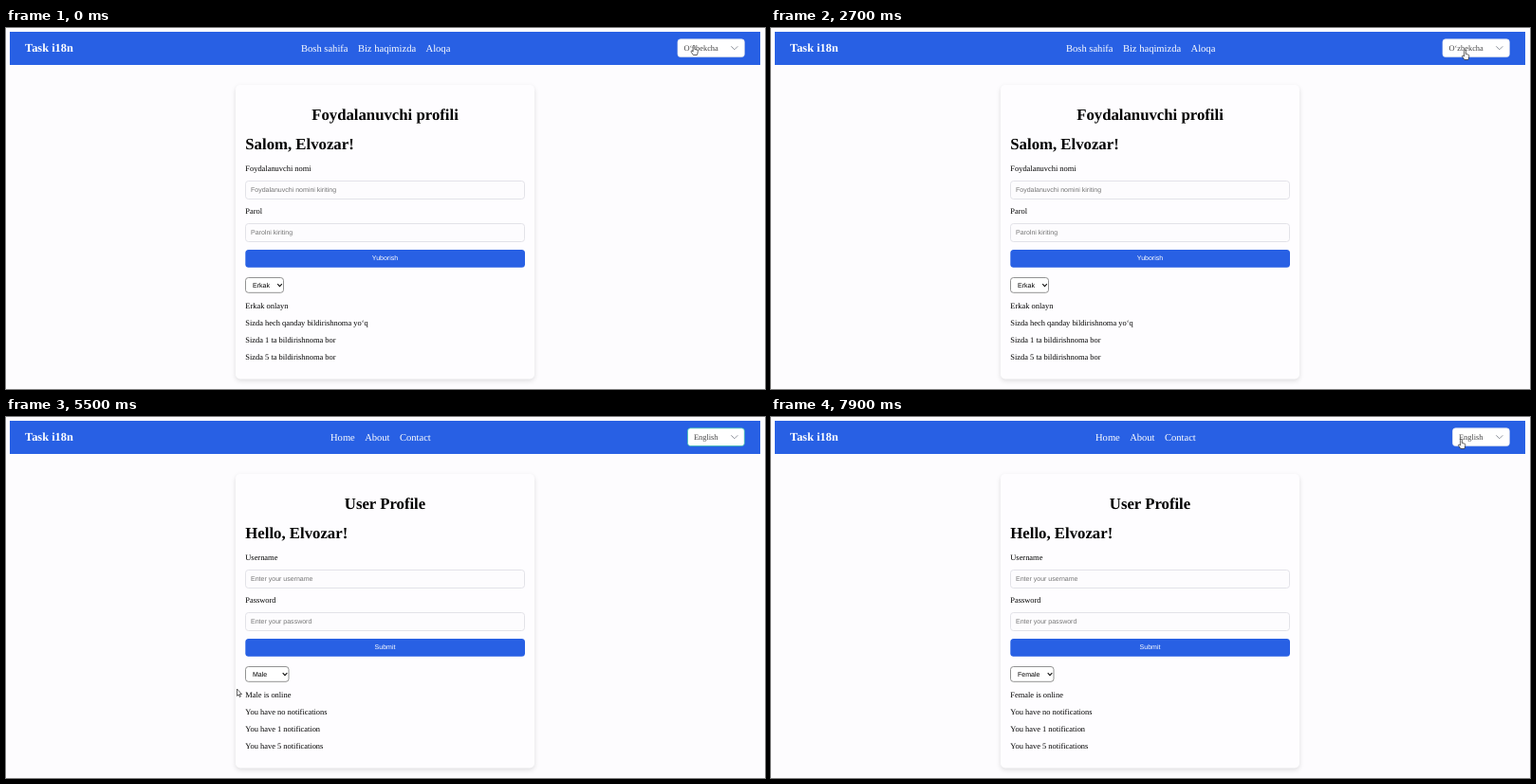
Animation of 800 by 381 pixels, one loop 8000 ms. Source, as an HTML page:

```html
<!DOCTYPE html>
<html lang="uz">
<head>
<meta charset="utf-8">
<title>Task i18n</title>
<style>
  html, body { margin: 0; width: 100%; height: 100%; overflow: hidden; background: #fdfcfe; }
  svg { display: block; width: 800px; height: 381px; }
  text { font: 8.42px "Liberation Serif", "Times New Roman", serif; text-rendering: geometricPrecision; }
  .logo { font-size: 12.4px; font-weight: bold; fill: #fff; }
  .nav { font-size: 10.55px; fill: #fff; }
  .h1 { font-size: 16.75px; font-weight: bold; }
  .ui { font: 7.02px "Liberation Sans", Arial, sans-serif; }
  .card { filter: drop-shadow(0 2px 2.5px rgba(0, 0, 0, .12)); }
  .menu { filter: drop-shadow(0 1px 2px rgba(0, 0, 0, .2)); }
</style>
</head>
<body>
<svg id="stage" viewBox="0 0 800 381"></svg>
<script>
const LOOP = 8000, STEP = 100;
const OPEN_LANG = 3100, PICK_LANG = 4000, OPEN_SEX = 6000, PICK_SEX = 6700;

const uz = {
  nav: ['Bosh sahifa', 'Biz haqimizda', 'Aloqa'], navX: 311,
  lang: 'O‘zbekcha', langX: 708, sexW: 40,
  title: 'Foydalanuvchi profili', hello: 'Salom, Elvozar!',
  user: 'Foydalanuvchi nomi', userHint: 'Foydalanuvchi nomini kiriting',
  pass: 'Parol', passHint: 'Parolni kiriting', send: 'Yuborish',
  sexes: ['Erkak', 'Ayol'], online: ' onlayn',
  notes: ['Sizda hech qanday bildirishnoma yo‘q', 'Sizda 1 ta bildirishnoma bor', 'Sizda 5 ta bildirishnoma bor']
};
const en = {
  nav: ['Home', 'About', 'Contact'], navX: 342,
  lang: 'English', langX: 718.5, sexW: 45.5,
  title: 'User Profile', hello: 'Hello, Elvozar!',
  user: 'Username', userHint: 'Enter your username',
  pass: 'Password', passHint: 'Enter your password', send: 'Submit',
  sexes: ['Male', 'Female'], online: ' is online',
  notes: ['You have no notifications', 'You have 1 notification', 'You have 5 notifications']
};

// Pointer tip: time, x, y
const path = [
  [0, 725, 18.5], [500, 723, 22], [1000, 720.5, 25.5], [1500, 724, 23],
  [2100, 729, 21.5], [2700, 731.5, 23.5], [3100, 731.5, 23.5], [3500, 738.5, 45.5],
  [4100, 738.5, 45.5], [4500, 732, 48], [5300, 246, 285], [5500, 243.5, 287],
  [5900, 275, 271], [6100, 275, 271], [6400, 273, 296], [6800, 273, 296],
  [7600, 727.5, 23.5], [LOOP, 727.5, 23.5]
];

function pointer(t) {
  const i = path.findIndex(p => p[0] > t);
  const [t0, x0, y0] = path[i - 1], [t1, x1, y1] = path[i];
  const u = (t - t0) / (t1 - t0), k = u * u * (3 - 2 * u);
  return [x0 + (x1 - x0) * k, y0 + (y1 - y0) * k];
}

const text = (x, y, s, cls = '', fill = '', extra = '') =>
  `<text x="${x}" y="${y}" class="${cls}" ${fill && `fill="${fill}"`} ${extra}>${s}</text>`;
const box = (x, y, w, h, r, fill, extra = '') =>
  `<rect x="${x}" y="${y}" width="${w}" height="${h}" rx="${r}" fill="${fill}" ${extra}/>`;
const line = (d, color, w) => `<path d="${d}" fill="none" stroke="${color}" stroke-width="${w}"/>`;
const middle = 'text-anchor="middle"';

function header(s, focused) {
  const nav = s.nav.map((n, i) => `<tspan dx="${i ? 10.4 : 0}">${n}</tspan>`).join('');
  return box(4, 4, 791, 35, 0, '#2860e4') +
    text(20, 25, 'Task i18n', 'logo') + text(s.navX, 24.5, nav, 'nav') +
    box(s.langX, 11.8, 778.3 - s.langX, 18.8, 3, '#fff',
      `stroke="${focused ? '#35c3a5' : '#e2e5ec'}" stroke-width=".7"`) +
    text(s.langX + 6.4, 24.2, s.lang, '', '#444') +
    line('M764.3 19.3l3.5 3.5 3.5-3.5', '#858a94', .9);
}

const field = (y, label, hint) =>
  text(252.3, y, label) +
  box(252.5, y + 10.5, 294, 19, 3, '#fdfcfe', 'stroke="#dcdce2" stroke-width=".8"') +
  text(258, y + 22.3, hint, 'ui', '#757575');

function card(s, sex) {
  return box(242, 60, 315, 310.5, 5, '#fefdff', 'class="card"') +
    text(399.5, 96.8, s.title, 'h1', '', middle) + text(252.3, 127.8, s.hello, 'h1') +
    field(151, s.user, s.userHint) + field(196, s.pass, s.passHint) +
    box(252.3, 234, 294.7, 18.8, 3.5, '#2860e4') +
    text(399.5, 245.4, s.send, 'ui', '#fff', middle) +
    box(252.5, 263.5, s.sexW, 15.8, 3, '#fff', 'stroke="#767676" stroke-width=".8"') +
    text(260, 273.6, s.sexes[sex], 'ui') +
    line(`M${250.2 + s.sexW - 4} 270.2l2.3 2.4 2.3-2.4`, '#111', 1.1) +
    [s.sexes[sex] + s.online, ...s.notes].map((n, i) => text(252.3, 295.5 + 18.1 * i, n)).join('');
}

function langMenu(y) {
  const items = ['English', 'Русский', 'O‘zbekcha'].map((name, i) => {
    const top = 34.8 + 19 * i, on = i === 2, hover = y > top && y < top + 18.5;
    return box(711, top, 66, 18.4, 2, on ? '#ebfcf3' : hover ? '#eef2f6' : '#fff') +
      text(717, top + 12, name, '', on ? '#189c66' : '#333');
  });
  return box(708.3, 32.3, 70.7, 61.3, 3, '#fff', 'class="menu"') + items.join('');
}

function sexMenu(s, y) {
  const active = y > 292 ? 1 : 0;
  return box(252.5, 279.8, s.sexW, 25.7, 0, '#fff', 'stroke="#777" stroke-width=".8"') +
    box(252.9, 280 + 12.6 * active, s.sexW - .8, 12.6, 0, '#1f64cf') +
    s.sexes.map((n, i) => text(260.8, 288.4 + 12.6 * i, n, 'ui', i === active ? '#fff' : '#111')).join('');
}

function cursor(x, y, hand) {
  const d = hand
    ? 'M-.9 .8a.9.9 0 0 1 1.8 0V4l2.5.6q1 .3 .9 1.3L3.9 8.5 3.3 10H-.6L-2.8 6.8q-.5-1 .3-1.2t1.6 1z'
    : 'M0 0V7.4L1.7 5.9 2.8 8.5 3.9 8 2.8 5.5H5z';
  return `<path d="${d}" transform="translate(${x} ${y})" fill="#fff" stroke="#222" stroke-width=".7" stroke-linejoin="round"/>`;
}

function draw(t) {
  const s = t < PICK_LANG ? uz : en;
  const langOpen = t >= OPEN_LANG && t < PICK_LANG;
  const sexOpen = t >= OPEN_SEX && t < PICK_SEX;
  const [x, y] = pointer(t);
  const hand = x > s.langX && (y < 31 || langOpen);
  return header(s, t >= OPEN_LANG && t < OPEN_SEX) +
    card(s, t < PICK_SEX ? 0 : 1) +
    (langOpen ? langMenu(y) : '') + (sexOpen ? sexMenu(s, y) : '') +
    cursor(x, y, hand);
}

const stage = document.getElementById('stage');
const start = performance.now();
let shown = -1;
function tick() {
  const t = Math.floor((performance.now() - start) % LOOP / STEP) * STEP;
  if (t !== shown) stage.innerHTML = draw(shown = t);
  requestAnimationFrame(tick);
}
tick();
</script>
</body>
</html>
```
